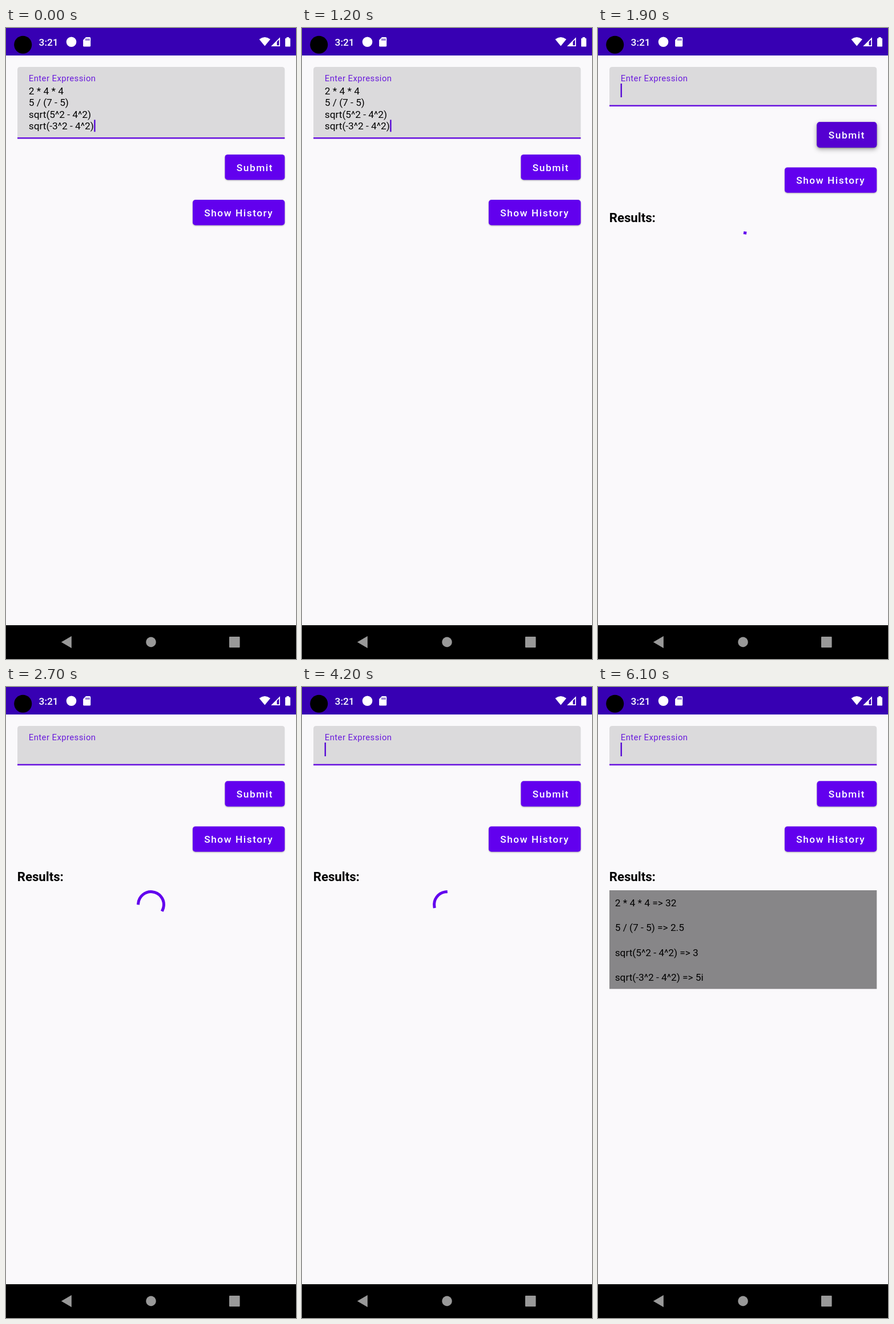
Animation of 508 by 1102 pixels, one loop 6400 ms. Source, as an HTML page:

```html
<!DOCTYPE html>
<html lang="en">
<head>
<meta charset="utf-8">
<title>Expression evaluator</title>
<style>
  html, body { margin: 0; width: 100%; height: 100%; overflow: hidden; background: #faf9fb; }
  svg { display: block; width: 508px; height: 1102px; }
  text { font: 17.29px Roboto, sans-serif; white-space: pre; }
  .label { font-size: 14.82px; letter-spacing: .46px; fill: #6a1bdc; }
  .button rect { fill: #6200ee; filter: drop-shadow(0 1px 1.3px rgba(0, 0, 0, .3)); }
  .button .pressed { fill: #5500d1; filter: drop-shadow(0 3px 4px rgba(0, 0, 0, .35)); }
  .button text { font-weight: 500; letter-spacing: 1.54px; fill: #fff; }
  .clock { font-weight: 500; fill: #fff; }
  .title { font-size: 22.2px; font-weight: 700; }
  #spinner { fill: none; stroke: #6200ee; stroke-width: 5; stroke-linecap: square; }
</style>
</head>
<body>
<svg viewBox="0 0 508 1102">
  <rect width="508" height="1102" fill="#faf9fb"/>

  <rect width="508" height="48" fill="#3700b3"/>
  <circle cx="29.7" cy="29.2" r="15.5"/>
  <text class="clock" x="57.6" y="31">3:21</text>
  <g fill="#fff">
    <circle cx="114.5" cy="24.2" r="8.8"/>
    <path d="M140 16h6.500q1.700 0 1.700 1.700v13.200q0 1.700-1.700 1.700h-9.700q-1.700 0-1.700-1.700v-10z"/>
    <path d="M453.300 31.500L443.600 19.700Q453.300 12.400 463 19.700z"/>
    <path d="M480 16.200V32H464.200zM478.300 20.300L474.600 24V30.300H478.300z" fill-rule="evenodd"/>
    <path d="M491.500 17.700V16h4.200v1.700h1.200q1.200 0 1.200 1.200v12.500q0 1.200-1.200 1.200h-6.600q-1.200 0-1.200-1.200V18.900q0-1.200 1.200-1.200z"/>
  </g>
  <path d="M140.300 18.500v3.500M142.900 18.500v3.500M145.500 18.500v3.500" stroke="#3700b3" stroke-width="1.300"/>

  <path id="field" fill="#dbdadc"/>
  <rect id="underline" x="20" width="468.300" height="2.500" fill="#6912e0"/>
  <text class="label" x="39.760" y="92.800">Enter Expression</text>
  <g id="input"></g>
  <rect id="cursor" width="2.500" fill="#5a0fd6"/>

  <g id="lower">
    <g class="button">
      <rect x="383.500" y="220.900" width="104.800" height="44.400" rx="4.900"/>
      <rect id="press" class="pressed" x="383.500" y="220.900" width="104.800" height="44.400" rx="4.900"/>
      <text x="403.800" y="249.600">Submit</text>
    </g>
    <g class="button">
      <rect x="327" y="300" width="161.300" height="44.400" rx="4.900"/>
      <text x="347.200" y="328.800">Show History</text>
    </g>
  </g>

  <text id="title" class="title" x="19.760" y="338.800">Results:</text>
  <circle id="spinner" cx="254" cy="380" r="22.400" pathLength="360"/>
  <g id="results"><rect x="20" y="355" width="468.300" height="172.300" fill="#878688"/></g>

  <rect y="1043" width="508" height="59"/>
  <g fill="#999">
    <path d="M96.800 1072.500L114.800 1062V1083z"/>
    <circle cx="254" cy="1072.400" r="8.800"/>
    <rect x="391" y="1063" width="18.600" height="19" rx="1"/>
  </g>
</svg>
<script>
const LOOP = 6400, STEP = 100;
const SUBMITTED = 1900, ANSWERED = 4300;
const CYCLE = 1333, SPIN = 720 / 4444;
const sums = [['2 * 4 * 4', '32'], ['5 / (7 - 5)', '2.5'],
              ['sqrt(5^2 - 4^2)', '3'], ['sqrt(-3^2 - 4^2)', '5i']];
const $ = id => document.getElementById(id);
const set = (id, attrs) => {
  for (const name in attrs) $(id).setAttribute(name, attrs[name]);
};
const show = (id, on) => set(id, { visibility: on ? 'visible' : 'hidden' });
const clamp = x => Math.min(1, Math.max(0, x));

function addText(parent, x, y, str) {
  const el = document.createElementNS($(parent).namespaceURI, 'text');
  el.setAttribute('x', x);
  el.setAttribute('y', y);
  el.textContent = str;
  $(parent).append(el);
}
sums.forEach(([sum, answer], i) => {
  addText('input', 39.76, 116.2 + i * 20.2, sum);
  addText('results', 29.7, 383.3 + i * 43.15, `${sum} => ${answer}`);
});

// Linear interpolation through [time, value] points.
function track(t, keys) {
  let i = 1;
  while (i < keys.length - 1 && t > keys[i][0]) i++;
  const [t0, v0] = keys[i - 1], [t1, v1] = keys[i];
  return v0 + (v1 - v0) * clamp((t - t0) / (t1 - t0));
}

// cubic-bezier(.4, 0, .2, 1)
function ease(x) {
  let lo = 0, hi = 1;
  for (let i = 0; i < 24; i++) {
    const u = (lo + hi) / 2, v = 1 - u;
    if (1.2 * u * v * v + .6 * u * u * v + u ** 3 < x) lo = u; else hi = u;
  }
  return lo * lo * (3 - 2 * lo);
}

function drawSpinner(t) {
  const trim = track(t, [[1900, 2], [2700, 840], [4200, 2278]]);
  const turn = track(t, [[1900, 54], [2700, 915], [4200, 2358]]);
  const f = trim % CYCLE / CYCLE;
  const tail = 270 * ease(clamp(f * 2 - 1));
  const head = 270 * ease(clamp(f * 2));
  const angle = tail + 90 * f + turn * SPIN - 90;
  set('spinner', {
    'stroke-dasharray': `${Math.max(.6, head - tail)} 360`,
    transform: `rotate(${angle} 254 380)`
  });
}

function render(t) {
  const sent = t >= SUBMITTED, done = t >= ANSWERED;
  const bottom = sent ? 137 : 193.5;
  set('field', { d: `M20 ${bottom}V73q0-5 5-5H483.300q5 0 5 5V${bottom}z` });
  set('underline', { y: bottom - 2.5 });
  set('cursor', sent ? { x: 39.5, y: 97, height: 24 } : { x: 154.1, y: 160.3, height: 21 });
  set('lower', { transform: `translate(0 ${sent ? -56.6 : 0})` });
  set('press', { opacity: track(t, [[1600, 0], [1800, 1], [1900, 1], [2100, 0]]) });
  show('cursor', Math.floor((t + 100) / 500) % 2 === 0);
  show('input', !sent);
  show('title', sent);
  show('spinner', sent && !done);
  show('results', done);
  if (sent && !done) drawSpinner(t);
}

let start;
function tick(now) {
  start ??= now;
  render(Math.floor((now - start) % LOOP / STEP) * STEP);
  requestAnimationFrame(tick);
}
render(0);
requestAnimationFrame(tick);
</script>
</body>
</html>
```
